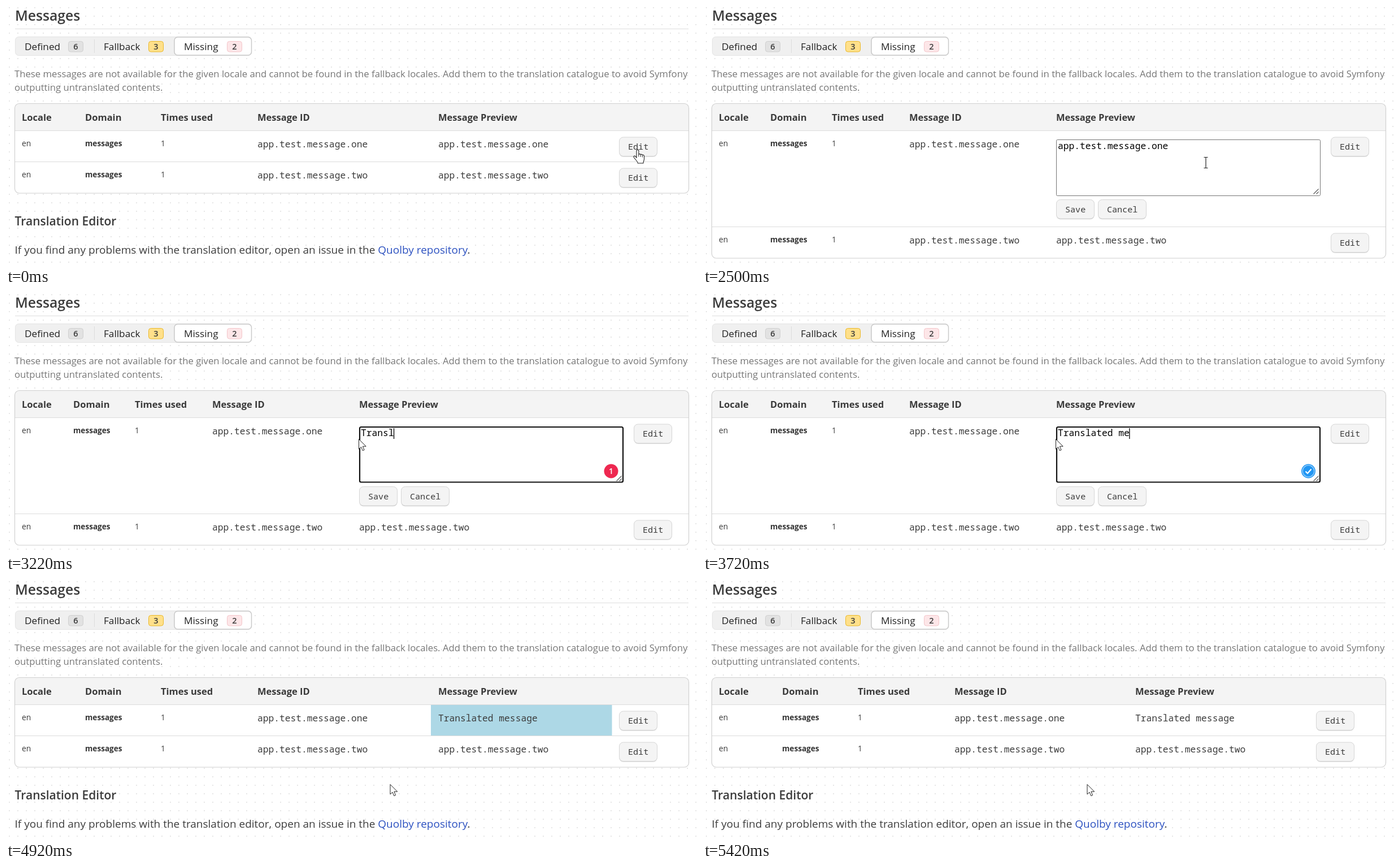
These frames come from a looping animation (1223x458 px, 9720 ms). An HTML page:

```html
<!DOCTYPE html>
<html lang="en">
<head>
<meta charset="utf-8">
<title>Translation editor</title>
<style>
html, body { margin: 0; height: 100%; overflow: hidden; background: #fff; }
svg { display: block; width: 100%; height: 100%; }
text { font-family: "Open Sans", "Noto Sans", sans-serif; fill: #3c3c3c; white-space: pre; }
.mono { font: 16.27px "Noto Sans Mono", "DejaVu Sans Mono", monospace; }
.btn { font: 15.1px "Noto Sans Mono", "DejaVu Sans Mono", monospace; }
.h1 { font-size: 24.7px; font-weight: 600; }
.h2 { font-size: 21px; font-weight: 600; }
.para { font-size: 19px; }
.link { fill: #2b50c0; }
.tab { font-size: 17.2px; fill: #222; }
.count { font-size: 14.5px; font-weight: 600; text-anchor: middle; }
.help { font-size: 16.72px; fill: #777; }
.th { font-size: 16.5px; font-weight: 700; fill: #3a3a3a; }
.td { font-size: 13.8px; }
.strong { font-size: 13.6px; font-weight: 700; fill: #333; }
.typed { fill: #000; }
.picked, .alert { fill: #fff; }
</style>
</head>
<body>
<svg viewBox="0 0 1223 458">
  <defs>
    <pattern id="dots" width="15" height="15" patternUnits="userSpaceOnUse">
      <circle cx="6" cy="3" r="1" fill="#dedede"/>
    </pattern>
  </defs>
  <rect width="1223" height="458" fill="url(#dots)"/>
  <g id="page"></g>
  <g id="scene"></g>
</svg>
<script>
const LOOP = 9720, OPEN = 2200, SAVED = 4920;
const OLD = 'app.test.message.one', NEW = 'Translated message';
const CHAR = 9.76, FIELD_X = 628;
const HEADS = ['Locale', 'Domain', 'Times used', 'Message ID', 'Message Preview'];
const COLS = { closed: [28, 140, 274, 445, 765, 1085], open: [28, 119, 228, 365, 625, 1111] };

// time, x, y of the pointer's hot spot
const POINTER = [
  [2200, 1117, 253], [2300, 1060, 262], [2400, 960, 272], [2500, 890, 277],
  [2600, 832, 262], [2800, 624, 258], [4120, 624, 258], [4420, 635, 342],
  [4620, 668, 358], [4920, 679.5, 361]
];
const TYPING = [[2835, 0], [3120, 4], [3720, 13], [4120, 18]];

const text = (x, y, cls, s) => `<text x="${x}" y="${y}" class="${cls}">${s}</text>`;
const rect = (x, y, w, h, r, fill, stroke = 'none', sw = 1) =>
  `<rect x="${x}" y="${y}" width="${w}" height="${h}" rx="${r}" fill="${fill}" stroke="${stroke}" stroke-width="${sw}"/>`;
const path = (d, stroke, sw = 1, fill = 'none') =>
  `<path d="${d}" fill="${fill}" stroke="${stroke}" stroke-width="${sw}"/>`;

function lerp(keys, t, k = 1) {
  if (t <= keys[0][0]) return keys[0][k];
  for (let i = 1; i < keys.length; i++) {
    const a = keys[i - 1], b = keys[i];
    if (t <= b[0]) return a[k] + (b[k] - a[k]) * (t - a[0]) / (b[0] - a[0]);
  }
  return keys[keys.length - 1][k];
}

const button = (x, y, w, label) =>
  rect(x + .5, y + 1.2, w - 1, 34, 7, '#d4d4d4') +
  rect(x + .5, y + .5, w - 1, 33.5, 7, '#f4f4f4', '#d6d6d6') +
  text(x + 16, y + 22.5, 'btn', label);

const count = (x, n, fill, stroke) =>
  rect(x + .5, 62.5, 26, 18.5, 4, fill, stroke) + text(x + 13.5, 77, 'count', n);

function page() {
  return text(16, 25.5, 'h1', 'Messages') +
    path('M16 40.5H1208', '#dedede') +
    rect(16.5, 54.5, 418, 33, 6, '#f0f0f0', '#e4e4e4') +
    path('M156.5 59V83', '#dcdcdc') +
    rect(298, 55, 136.5, 32, 6, '#fff', '#c9c9c9', 1.5) +
    text(33, 78, 'tab', 'Defined') + count(110, 6, '#e2e2e2', '#d0d0d0') +
    text(173, 78, 'tab', 'Fallback') + count(252, 3, '#ffe08a', '#eab92c') +
    text(315, 78, 'tab', 'Missing') + count(391, 2, '#fde6e8', '#f3c6ca') +
    text(15, 126, 'help', 'These messages are not available for the given locale and cannot be found in the fallback locales. Add them to the translation catalogue to avoid Symfony') +
    text(15, 150, 'help', 'outputting untranslated contents.');
}

const row = (cols, y, id, preview) =>
  text(cols[0], y, 'td', 'en') + text(cols[1], y, 'strong', 'messages') +
  text(cols[2], y, 'td', 1) + text(cols[3], y + 1.5, 'mono', id) +
  text(cols[4], y + 1.5, 'mono', preview) + button(cols[5], y - 16.5, 68, 'Edit');

function table(open, preview, glow) {
  const cols = open ? COLS.open : COLS.closed;
  const line = open ? 390.5 : 275.5, bottom = line + 55.5;
  return rect(15.5, 172.5, 1193, bottom - 172.5, 8, '#fff') +
    path('M15.5 220.5V180.5a8 8 0 0 1 8-8H1200.5a8 8 0 0 1 8 8V220.5Z', 'none', 0, '#f4f4f4') +
    (glow ? `<g opacity="${glow}">${rect(752, 221, 320.5, 54.5, 0, '#add8e6')}</g>` : '') +
    path(`M16 220.5H1208M16 ${line}H1208`, '#dcdcdc') +
    rect(15.5, 172.5, 1193, bottom - 172.5, 8, 'none', '#d0d0d0', 1.2) +
    HEADS.map((h, i) => text(cols[i], 203, 'th', h)).join('') +
    row(cols, 248, OLD, preview) +
    row(cols, line + 27.5, 'app.test.message.two', 'app.test.message.two');
}

function badge(t) {
  if (t < 2700) return '';
  if (t < 3320) return '<circle cx="1071" cy="315" r="12.5" fill="#ee2850"/>' +
    text(1071, 320, 'count alert', 1);
  return '<circle cx="1071.5" cy="315" r="12.5" fill="#2196f3"/>' +
    '<circle cx="1071.5" cy="315" r="10.3" fill="none" stroke="#9bd0fa" stroke-width="1.3"/>' +
    path('M1066.5 315.5L1070 319L1076.5 311.5', '#fff', 2.2);
}

function editor(t, x) {
  const focus = t >= 2600, typed = Math.round(lerp(TYPING, t));
  let s = focus ? rect(626, 237, 466, 97.5, 2.5, '#fff', '#111', 2.2)
                : rect(625.5, 236.5, 467, 99, 2, '#fff', '#767676');
  s += path('M1080.5 332.5L1089.5 323.5M1085.5 332.5L1089.5 328.5', '#555', 1.1);
  if (typed) {
    const end = FIELD_X + typed * CHAR;
    s += text(FIELD_X, 253, 'mono typed', NEW.slice(0, typed));
    if (t < 4400) s += path(`M${end} 239V258`, '#000', 1.3);
  } else {
    const from = Math.min(20, Math.max(0, Math.round((x - FIELD_X) / CHAR)));
    const cut = focus ? from : 20, mid = FIELD_X + cut * CHAR;
    s += rect(mid, 238, (20 - cut) * CHAR, 20, 0, '#3367d1') +
      text(FIELD_X, 253, 'mono typed', OLD.slice(0, cut)) +
      text(mid, 253, 'mono picked', OLD.slice(cut));
    if (t >= 2700) s += path('M628 257.2H658', '#f0a43a', 2);
  }
  return s + badge(t) + button(625, 342, 68, 'Save') + button(699, 342, 86, 'Cancel');
}

function pointer(t, x, y) {
  const open = t >= OPEN && t < SAVED;
  const at = (dx, dy, s) =>
    `<g transform="translate(${x + dx} ${y + dy})" stroke-linejoin="round">${s}</g>`;
  if (t < OPEN || open && (x > 1110 || x > 636 && y > 343)) {
    return at(-7, .5,
      path('M6 15V2.5a1.9 1.9 0 0 1 3.8 0V9c.3-1.3 3.2-1.3 3.5.6c.5-1.2 3-1 3.3.8c.7-1 2.9-.6 2.9 1.6V17c0 3-1.6 4-1.6 7.5H8.2C8 21 4 18.5 1.2 14c-.9-1.6 1-3.2 2.6-1.8z', '#222', 1.1, '#fff') +
      path('M9.8 9v4M13.3 10v3.4M16.6 11v3', '#222'));
  }
  if (open && x > 627 && x < 1092 && y > 237 && y < 334)
    return at(0, 0, path('M-3.5 -9.5H3.5M0 -9.5V9.5M-3.5 9.5H3.5', '#222', 1.2));
  return at(.5, .5, path('M0 0V17.5L4 13.7L6.8 20.2L9.6 19L6.9 12.7H12.7Z', '#222', 1, '#fff'));
}

function scene(t) {
  const open = t >= OPEN && t < SAVED;
  const x = lerp(POINTER, t), y = lerp(POINTER, t, 2);
  const glow = t < SAVED || t >= 5420 ? 0 : t < 5220 ? 1 : .5;
  const preview = open ? '' : t < OPEN ? OLD : NEW;
  const footer = text(15.5, 388, 'h2', 'Translation Editor') +
    text(15.5, 438, 'para', 'If you find any problems with the translation editor, open an issue in the <tspan class="link">Quolby repository</tspan>.');
  return table(open, preview, glow) + (open ? editor(t, x) : footer) + pointer(t, x, y);
}

const step = t => t < 3120 ? Math.min(3000, Math.floor(t / 100) * 100)
                           : Math.floor((t - 20) / 100) * 100 + 20;

const stage = document.getElementById('scene');
const start = performance.now();
let shown = '';

function frame() {
  const next = scene(step((performance.now() - start) % LOOP));
  if (next !== shown) stage.innerHTML = shown = next;
  requestAnimationFrame(frame);
}

document.getElementById('page').innerHTML = page();
frame();
</script>
</body>
</html>
```
